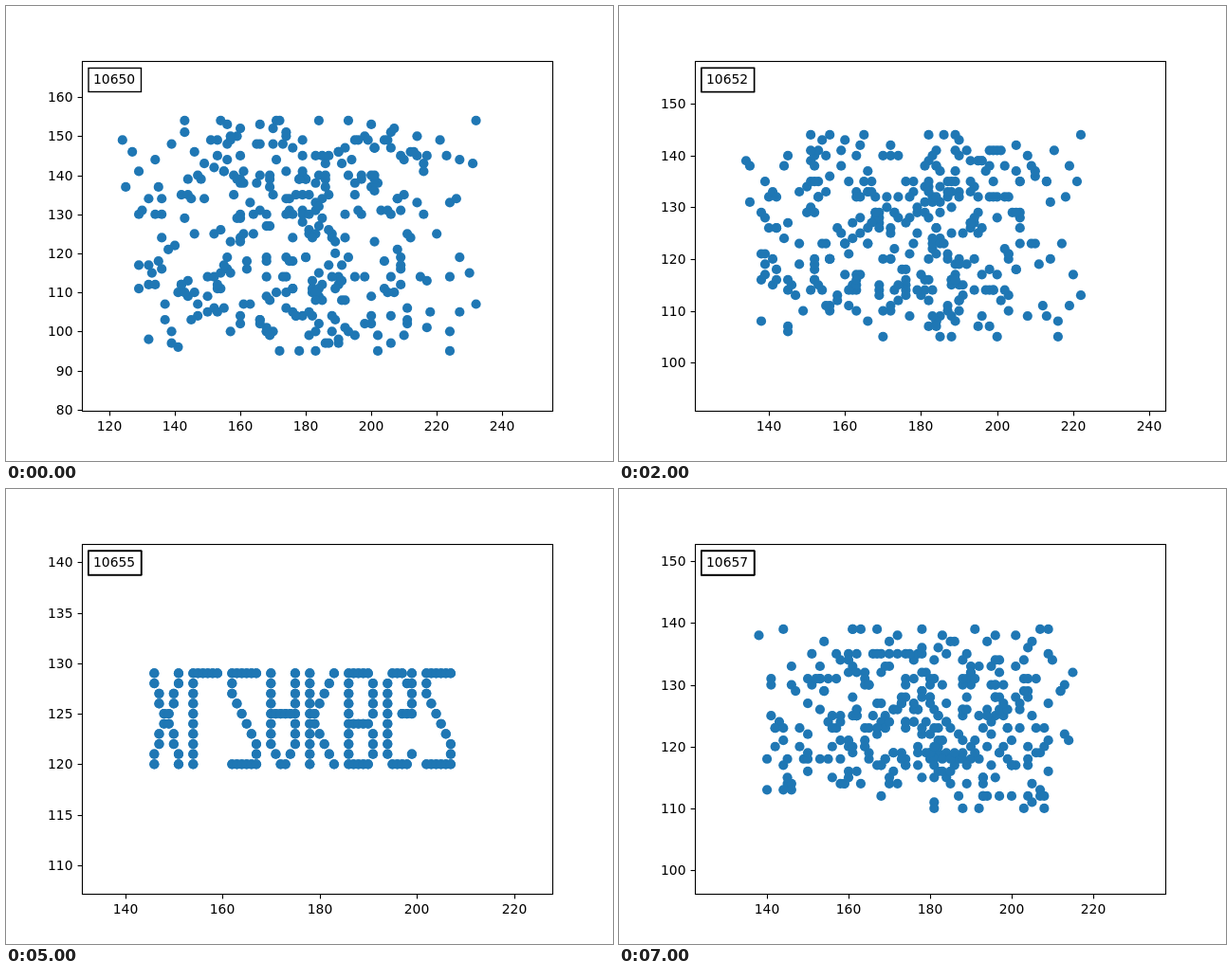
These frames come from a looping animation (640x480 px, 8000 ms). An HTML page with a canvas:

```html
<!DOCTYPE html>
<html lang="en">
<head>
<meta charset="utf-8">
<title>Converging points</title>
<style>
  html, body { margin: 0; width: 100%; height: 100%; overflow: hidden; background: #fff; }
  canvas { display: block; }
</style>
</head>
<body>
<canvas id="stage" width="640" height="480"></canvas>
<script>
const ctx = document.getElementById('stage').getContext('2d');
const STEP = 1000, STEPS = 8, FIRST = 10650, MEET = 5;
const LEFT = 80, RIGHT = 576, TOP = 57.6, BOTTOM = 427.2;

// Horizontal axis limits of each step
const X_MIN = [111.6, 116.1, 120.55, 124.95, 128.6, 131.1, 126.9, 122.3];
const X_MAX = [255.3, 249.7, 244.2, 238.8, 233.3, 227.9, 232, 237.7];

// Letter strokes on a 6 x 10 grid, each written as x1 y1 x2 y2
const STROKES = {
  X: '0024 5034 0925 5935',
  L: '0009 0959',
  Z: '0050 5052 5207 0709 0959',
  A: '2002 3052 0209 5259 0555',
  K: '0009 5014 1559',
  B: '0009 0040 0444 0949 5153 5558',
  G: '1040 5151 0108 3555 5559 4848 1939'
};

let seed = 10655;
function random() {
  seed = (seed * 1664525 + 1013904223) % 4294967296;
  return seed / 4294967296;
}

// Whole speed from 1 to 5, either way
function speed() {
  const size = 1 + Math.floor(random() * 5);
  return random() < 0.5 ? -size : size;
}

function letterCells(letter) {
  const cells = new Map();
  for (const stroke of STROKES[letter].split(' ')) {
    const [x1, y1, x2, y2] = [...stroke].map(Number);
    const n = Math.max(Math.abs(x2 - x1), Math.abs(y2 - y1)) || 1;
    for (let i = 0; i <= n; i++) {
      const x = x1 + Math.trunc((x2 - x1) * i / n);
      const y = y1 + Math.trunc((y2 - y1) * i / n);
      cells.set(x + ',' + y, [x, y]);
    }
  }
  return [...cells.values()];
}

// Two points meet in every cell of the message
const points = [];
[...'XLZAKBGZ'].forEach((letter, index) => {
  for (const [cx, cy] of letterCells(letter)) {
    for (let copy = 0; copy < 2; copy++) {
      const x = 146 + 8 * index + cx, y = 120 + cy;
      let vx;
      do vx = speed();
      while (x - 5 * vx < 124 || x - 5 * vx > 232 || x + 2 * vx > 216);
      points.push({ x, y, vx, vy: speed() });
    }
  }
});

function line(x1, y1, x2, y2) {
  ctx.beginPath();
  ctx.moveTo(x1, y1);
  ctx.lineTo(x2, y2);
  ctx.stroke();
}

function drawTicks(min, max, step, drawTick) {
  for (let v = Math.ceil(min / step) * step; v <= max; v += step) drawTick(v);
}

function draw(step) {
  const k = step - MEET;
  const xMin = X_MIN[step], xMax = X_MAX[step];
  const half = (9 + 10 * Math.abs(k)) * 0.55 + 12.4;
  const yMin = 124.5 - half, yMax = 124.5 + half;
  const toX = x => LEFT + (x - xMin) / (xMax - xMin) * (RIGHT - LEFT);
  const toY = y => BOTTOM - (y - yMin) / (yMax - yMin) * (BOTTOM - TOP);

  ctx.fillStyle = '#fff';
  ctx.fillRect(0, 0, 640, 480);

  ctx.fillStyle = '#1f77b4';
  for (const p of points) {
    ctx.beginPath();
    ctx.arc(toX(p.x + p.vx * k), toY(p.y + p.vy * k), 5.1, 0, 2 * Math.PI);
    ctx.fill();
  }

  ctx.fillStyle = ctx.strokeStyle = '#000';
  ctx.font = '13.89px "DejaVu Sans", sans-serif';
  ctx.lineWidth = 1.11;
  ctx.strokeRect(80.5, 58.5, 496, 369);

  ctx.textAlign = 'center';
  drawTicks(xMin, xMax, 20, v => {
    const x = Math.round(toX(v)) + 0.5;
    line(x, 427.5, x, 432.4);
    ctx.fillText(v, x - 0.5, 448);
  });
  ctx.textAlign = 'right';
  drawTicks(yMin, yMax, k ? 10 : 5, v => {
    const y = Math.round(toY(v)) + 0.5;
    line(75.6, y, 80.5, y);
    ctx.fillText(v, 70.5, y + 4.5);
  });

  // The box is redrawn over itself at every step, so its edge grows heavier
  ctx.lineWidth = 1.39;
  for (let i = 0; i <= step; i++) {
    ctx.fillStyle = '#fff';
    ctx.fillRect(87, 65.5, 55.5, 25);
    ctx.strokeRect(87, 65.5, 55.5, 25);
  }
  ctx.fillStyle = '#000';
  ctx.textAlign = 'left';
  ctx.fillText(FIRST + step, 92, 82);
}

const start = performance.now();
let shown = -1;
function tick() {
  const step = Math.floor((performance.now() - start) / STEP) % STEPS;
  if (step !== shown) draw(shown = step);
  requestAnimationFrame(tick);
}
tick();
</script>
</body>
</html>
```
